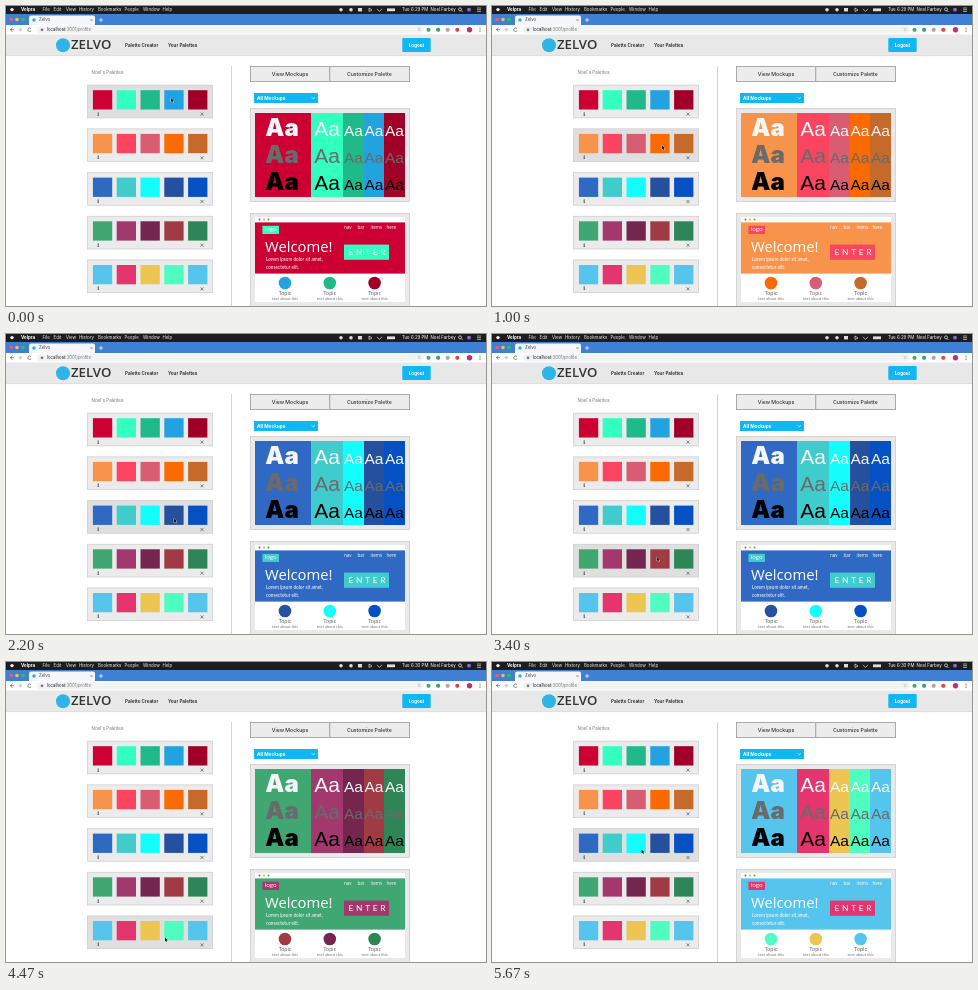
An HTML page with a canvas for the animation above (5740 ms loop, 480 by 300 pixels).

```html
<!DOCTYPE html>
<html lang="en">
<head>
<meta charset="utf-8">
<title>Palettes</title>
<style>
html, body { margin: 0; width: 100%; height: 100%; overflow: hidden; background: #fff; }
canvas { display: block; width: 480px; height: 300px; }
</style>
</head>
<body>
<canvas id="stage"></canvas>
<script>
const canvas = document.getElementById('stage');
const ctx = canvas.getContext('2d');
const ratio = window.devicePixelRatio || 1;
canvas.width = 480 * ratio;
canvas.height = 300 * ratio;

const LOOP = 5740, STEP = 1000 / 15;
const CARD = { top: 78.8, pitch: 43.7, height: 33.4 };
const UI = 'Inter, "Liberation Sans", sans-serif';
const ARIAL = '"Liberation Sans", Arial, sans-serif';
const HUMAN = '"Open Sans", "Noto Sans", sans-serif';
const SOFT = 'Lato, "Open Sans", sans-serif';

const palettes = [
  ['#cc0033', '#33ffc0', '#1fb98a', '#22a3e0', '#a00028'],
  ['#f7934a', '#fb4560', '#d85d72', '#fb6a00', '#c56a2a'],
  ['#2f69c3', '#40cccd', '#13fdfd', '#24509d', '#0550c2'],
  ['#40a672', '#a3386f', '#75264f', '#a03b45', '#2e8558'],
  ['#56c5ee', '#e4356e', '#ecc553', '#50fdc0', '#56c5ee']
];
// time at which each palette is applied to the mockups
const picks = [0, 1000, 2070, 3470, 4730];
// start, end, x, y
const moves = [
  [0, 530, 170, 139.5],
  [1340, 1800, 168, 184.5],
  [2540, 3000, 165, 223],
  [3940, 4330, 159, 275.5],
  [5400, 5670, 149.5, 187.5]
];

function rect(x, y, w, h, fill, line) {
  ctx.fillStyle = fill;
  ctx.fillRect(x, y, w, h);
  if (!line) return;
  ctx.strokeStyle = line;
  ctx.lineWidth = 0.8;
  ctx.strokeRect(x + 0.4, y + 0.4, w - 0.8, h - 0.8);
}

function round(x, y, w, h, r, fill) {
  ctx.fillStyle = fill;
  ctx.beginPath();
  ctx.roundRect(x, y, w, h, r);
  ctx.fill();
}

function dot(x, y, r, fill) {
  ctx.fillStyle = fill;
  ctx.beginPath();
  ctx.arc(x, y, r, 0, Math.PI * 2);
  ctx.fill();
}

function path(points, color, width = 0.7) {
  ctx.strokeStyle = color;
  ctx.lineWidth = width;
  ctx.beginPath();
  points.forEach(([x, y]) => ctx.lineTo(x, y));
  ctx.stroke();
}

function text(str, x, y, size, color, o = {}) {
  ctx.font = `${o.weight || 400} ${size}px ${o.font || UI}`;
  ctx.textAlign = o.align || 'left';
  ctx.textBaseline = o.base || 'middle';
  ctx.letterSpacing = (o.gap || 0) + 'px';
  ctx.fillStyle = color;
  ctx.fillText(str, x, y);
  ctx.letterSpacing = '0px';
}

function cross(x, y, r, color, width) {
  path([[x - r, y - r], [x + r, y + r]], color, width);
  path([[x + r, y - r], [x - r, y + r]], color, width);
}

function menuBar(t) {
  rect(0, 0, 480, 8, '#1d1d20');
  dot(6, 3.6, 1.7, '#f2f2f2');
  text('Velpra', 15, 3.7, 4.5, '#fff', { weight: 700 });
  [['File', 36.5], ['Edit', 47.5], ['View', 60], ['History', 73], ['Bookmarks', 92],
   ['People', 118.5], ['Window', 137], ['Help', 156.5]]
    .forEach(([s, x]) => text(s, x, 3.7, 4.4, '#eee'));
  for (const x of [335, 345]) dot(x, 3.7, 1.8, '#ddd');
  rect(352, 2, 4, 3.4, '#ddd');
  path([[363, 5.5], [363, 2], [366, 4], [363, 5.5]], '#ddd');
  path([[371, 2.8], [373.5, 5.4], [376, 2.8]], '#ddd');
  rect(381, 2.4, 8, 2.8, '#ddd');
  text(t < 4130 ? 'Tue 6:29 PM' : 'Tue 6:30 PM', 396, 3.7, 4.4, '#fff');
  text('Noel Farbey', 424.5, 3.7, 4.4, '#fff');
  ctx.strokeStyle = '#eee';
  ctx.lineWidth = 0.7;
  ctx.beginPath();
  ctx.arc(454, 3.3, 1.5, 0, 7);
  ctx.stroke();
  path([[455, 4.4], [456.6, 6]], '#eee');
  dot(463, 3.7, 1.9, '#9a65d8');
  for (const y of [2, 3.7, 5.4]) path([[471, y], [475, y]], '#eee', 0.6);
}

function browser() {
  rect(0, 8, 480, 11, '#4080d4');
  ['#fc5b57', '#fdbc40', '#34c84a'].forEach((c, i) => dot(5 + i * 6, 13.5, 1.8, c));
  round(23, 9.5, 66, 12, 2, '#f5f7fa');
  dot(28, 14, 1.8, '#2fb4e8');
  text('Zelvo', 33, 14.2, 4.3, '#444');
  cross(85.5, 14, 1.1, '#666', 0.5);
  path([[93, 14], [97, 14]], '#fff');
  path([[95, 12], [95, 16]], '#fff');

  rect(0, 19, 480, 9.5, '#fff');
  path([[6.5, 21.8], [4.5, 23.7], [6.5, 25.6]], '#555');
  path([[4.5, 23.7], [8, 23.7]], '#555');
  path([[13.7, 21.8], [15.7, 23.7], [13.7, 25.6]], '#aaa');
  path([[12, 23.7], [15.7, 23.7]], '#aaa');
  ctx.strokeStyle = '#555';
  ctx.beginPath();
  ctx.arc(23.5, 23.7, 1.8, 0.6, 5.8);
  ctx.stroke();
  round(31, 20.3, 387, 7, 3.5, '#f1f3f4');
  dot(36, 23.8, 1.4, '#777');
  text('localhost:', 41, 23.9, 4.3, '#222');
  const w = ctx.measureText('localhost:').width;
  text('3001/profile', 41 + w, 23.9, 4.3, '#777');
  text('☆', 411, 23.9, 5, '#666', { font: '"DejaVu Sans", sans-serif' });
  ['#3fae6a', '#35a08a', '#a9a9a9', '#d84a4a'].forEach((c, i) => dot(422.5 + i * 9.6, 23.8, 2.1, c));
  dot(463.5, 23.8, 2.7, '#b8327c');
  for (const y of [22, 23.8, 25.6]) dot(474, y, 0.55, '#555');
}

function header() {
  rect(0, 28.5, 480, 21.5, '#e8e8e8');
  rect(0, 49.5, 480, 0.6, '#d8d8d8');
  dot(57, 39.3, 7, '#2fb4e8');
  text('ZELVO', 65, 39.5, 13.2, '#333', { weight: 600, font: HUMAN });
  text('Palette Creator', 119, 39.5, 4.6, '#222', { weight: 600 });
  text('Your Palettes', 162, 39.5, 4.6, '#222', { weight: 600 });
  round(396.3, 32, 28.4, 14, 1, '#10b7f3');
  text('Logout', 410.5, 39.2, 4.5, '#fff', { weight: 700, align: 'center' });
}

function cards(hover) {
  text("Noel's Palettes:", 85.5, 67, 4.5, '#777');
  palettes.forEach((colors, row) => {
    const y = CARD.top + row * CARD.pitch;
    rect(81, y, 126, CARD.height, row === hover ? '#dfdfdf' : '#ebebeb', '#d3d3d3');
    colors.forEach((c, i) => rect(86.9 + i * 23.8, y + 5.4, 19.3, 19.3, c));
    text('i', 92.3, y + 29.3, 5.4, '#444', { weight: 600, font: '"Noto Serif", serif', align: 'center' });
    cross(196, y + 29.3, 1.5, '#555', 0.7);
  });
  rect(225, 60, 0.8, 240, '#c9c9c9');
}

function controls() {
  rect(244, 60, 80, 16, '#ececec', '#999');
  rect(323.4, 60, 80.6, 16, '#ececec', '#999');
  text('View Mockups', 284, 68, 5.2, '#333', { weight: 500, align: 'center' });
  text('Customize Palette', 363.3, 68, 5.2, '#333', { weight: 500, align: 'center' });
  rect(248, 87, 64, 10, '#10b7f3');
  text('All Mockups', 251, 92.2, 4.7, '#fff', { weight: 700 });
  path([[305.8, 91.3], [307.3, 92.8], [308.8, 91.3]], '#fff', 0.8);
}

function typeMockup(colors) {
  rect(244, 102, 160, 94, '#e9e9e9', '#d0d0d0');
  const edges = [249, 305, 337, 358, 378, 399];
  const sizes = [24, 21, 15.5, 15.5, 15.5];
  colors.forEach((c, i) => rect(edges[i], 107, edges[i + 1] - edges[i], 84, c));
  ['#f6f6f6', '#6a6a6a', '#000'].forEach((ink, row) => {
    sizes.forEach((size, i) => {
      const mid = (edges[i] + edges[i + 1]) / 2;
      text('Aa', i ? mid : 276, 130 + row * 26.8, size, ink, {
        weight: i ? 400 : 900, font: i ? ARIAL : UI, align: 'center', base: 'alphabetic'
      });
    });
  });
}

function siteMockup(c) {
  rect(244, 207, 160, 100, '#e9e9e9', '#d0d0d0');
  rect(249, 211, 150, 85, '#fff');
  ['#e8594f', '#e9b93f', '#58b957'].forEach((f, i) => dot(253.5 + i * 4.5, 213.6, 1.1, f));
  rect(249, 216.4, 150, 51.2, c[0]);
  rect(256.4, 219.8, 16.6, 8.2, c[1]);
  text('logo', 264.7, 223.6, 6, '#fff', { font: HUMAN, align: 'center' });
  [['nav', 338], ['bar', 351.5], ['items', 364.5], ['here', 380.5]]
    .forEach(([s, x]) => text(s, x, 221.8, 4.5, '#fff', { font: HUMAN }));
  text('Welcome!', 259, 246, 14.8, '#fff', { font: HUMAN, base: 'alphabetic' });
  text('Lorem ipsum dolor sit amet,', 260, 254, 4.7, '#fff', { font: SOFT });
  text('consectetur elit.', 260, 261.2, 4.7, '#fff', { font: SOFT });
  rect(338, 238.6, 45, 15.2, c[1]);
  text('ENTER', 342.5, 246.4, 8.4, '#fff', { font: SOFT, gap: 2.7 });
  [c[3], c[2], c[4]].forEach((f, i) => {
    const x = 279 + i * 44.8;
    dot(x, 277, 6.3, f);
    text('Topic', x, 287.4, 5.2, '#555', { font: HUMAN, align: 'center' });
    text('text about this', x, 292.6, 4.1, '#777', { font: SOFT, align: 'center' });
  });
}

function pointer(x, y) {
  ctx.beginPath();
  [[0, 0], [0, 4], [1, 3.2], [1.7, 4.6], [2.3, 4.3], [1.7, 2.9], [2.9, 2.8]]
    .forEach(([dx, dy]) => ctx.lineTo(x + dx, y + dy));
  ctx.closePath();
  ctx.strokeStyle = '#fff';
  ctx.lineWidth = 0.6;
  ctx.stroke();
  ctx.fillStyle = '#111';
  ctx.fill();
}

function pointerAt(t) {
  let x = 165, y = 92;
  for (const [from, to, mx, my] of moves) {
    const p = Math.min(1, Math.max(0, (t - from) / (to - from)));
    const e = p * p * (3 - 2 * p);
    x += (mx - x) * e;
    y += (my - y) * e;
  }
  return [x, y];
}

function draw(time) {
  const t = Math.floor((time % LOOP + 5) / STEP) * STEP + 5;
  const [x, y] = pointerAt(t);
  const row = Math.floor((y - CARD.top) / CARD.pitch);
  const inside = y - CARD.top - row * CARD.pitch <= CARD.height;
  const colors = palettes[picks.filter(p => t >= p).length - 1];

  ctx.setTransform(ratio, 0, 0, ratio, 0, 0);
  rect(0, 0, 480, 300, '#fff');
  menuBar(t);
  browser();
  header();
  cards(inside ? row : -1);
  controls();
  typeMockup(colors);
  siteMockup(colors);
  pointer(x, y);
}

const start = performance.now();
function tick() {
  draw(performance.now() - start);
  requestAnimationFrame(tick);
}
tick();
</script>
</body>
</html>
```
